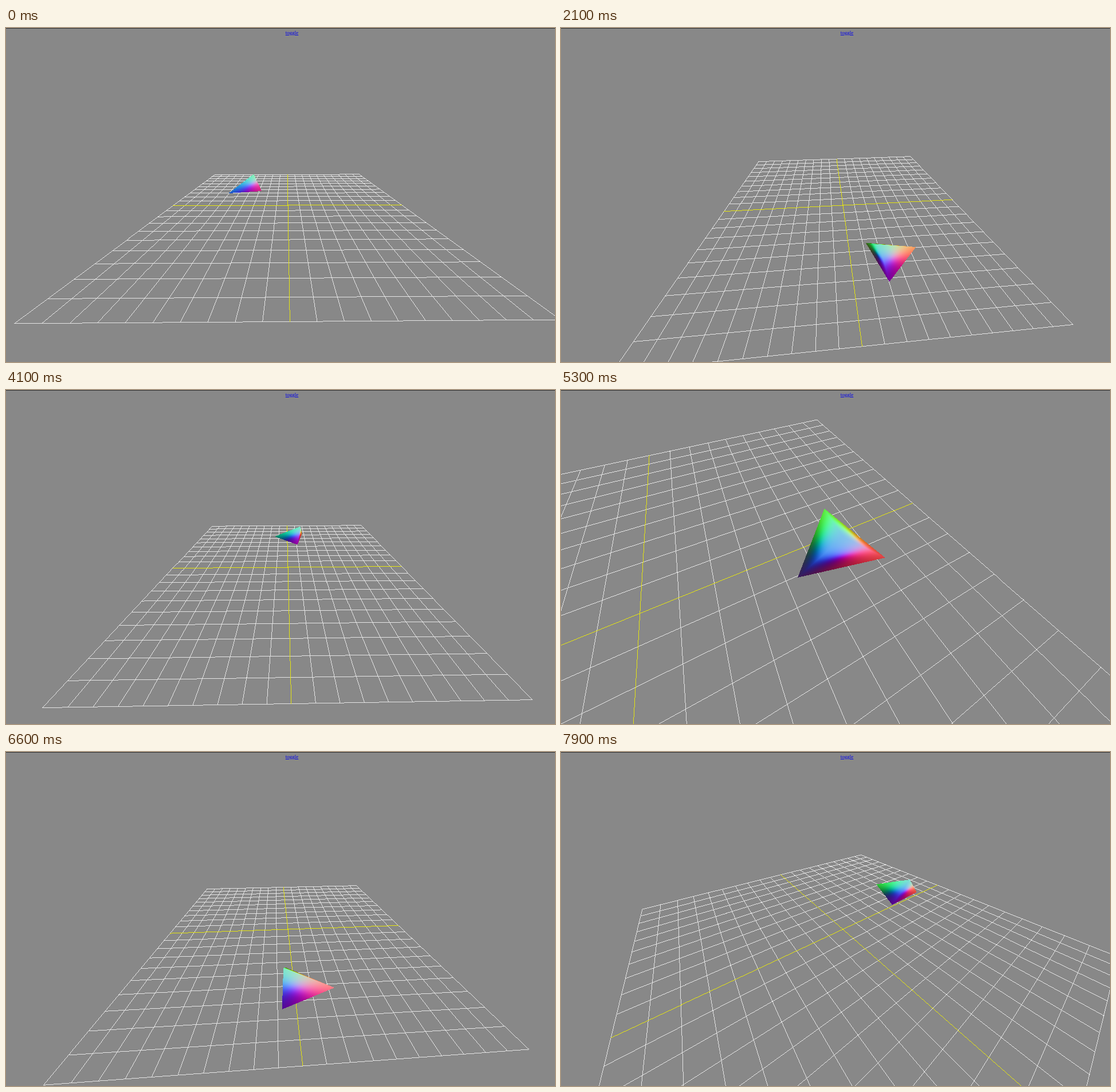
An HTML page with a canvas that plays this animation: 958 by 584 pixels, repeating every 8 s.

```html
<!DOCTYPE html>
<html lang="en">
<head>
<meta charset="utf-8">
<title>Orbiting pyramid</title>
<style>
  html, body { margin: 0; width: 100%; height: 100%; overflow: hidden; background: #888; }
  canvas, svg { position: absolute; left: 0; top: 0; display: block; }
  text { font: 9px "Liberation Serif", "Times New Roman", serif; text-decoration: underline; }
</style>
</head>
<body>
<canvas id="stage" width="958" height="584"></canvas>
<svg width="958" height="584"><text id="link" x="499" y="11" text-anchor="middle" fill="#00e">toggle</text></svg>
<script>
const W = 958, H = 584, LOOP = 8000;
const CX = 492, CY = 310, FOCAL = 310, NEAR = 0.5;
const ctx = document.getElementById('stage').getContext('2d');
const link = document.getElementById('link');
const image = ctx.createImageData(W, H);
const pixels = new Uint32Array(image.data.buffer);
const rgb = (r, g, b) => (255 << 24 | b << 16 | g << 8 | r) >>> 0;
const GRAY = rgb(136, 136, 136), WHITE = rgb(228, 228, 228), YELLOW = rgb(228, 228, 16), DARK = rgb(45, 45, 45);
const RAD = Math.PI / 180;

// time, turn, pitch, distance of the free camera
const cameraKeys = [
  [0, 0.007, 0.4412, 15.55],
  [1000, 0.007, 0.4412, 15.55],
  [1850, 0.083, 0.6608, 15.55],
  [2150, 0.083, 0.6608, 15.55],
  [2700, 0.0136, 0.592, 15.55],
  [6550, 0.0136, 0.592, 15.55],
  [6850, 0.63, 0.698, 15.55],
  [7150, 0.63, 0.698, 7.88],
  [7250, 0.63, 0.698, 7.88],
  [7800, 0.63, 0.698, 10.7],
  [LOOP, 0.63, 0.698, 10.7]
];
const RADIUS = 6, FOLLOW_TURN = 15 * RAD;
const orbitAngle = t => (127.6 + 0.07522 * t) * RAD;

function freeCamera(t) {
  let i = 1;
  while (i < cameraKeys.length - 1 && cameraKeys[i][0] <= t) i++;
  const a = cameraKeys[i - 1], b = cameraKeys[i];
  const k = (t - a[0]) / (b[0] - a[0]), s = k * k * (3 - 2 * k);
  const [turn, pitch, dist] = [1, 2, 3].map(j => a[j] + (b[j] - a[j]) * s);
  return { turn, pitch, dist, target: [0, 0] };
}

function followCamera(t) {
  return {
    turn: FOLLOW_TURN - orbitAngle(t), pitch: Math.atan2(5, 3.12), dist: Math.hypot(5, 3.12),
    target: [RADIUS * Math.cos(FOLLOW_TURN), RADIUS * Math.sin(FOLLOW_TURN)]
  };
}

// World axes: east, north, up. View axes: right, up, toward the viewer.
function makeView({ turn, pitch, dist, target }) {
  const ct = Math.cos(turn), st = Math.sin(turn), c = Math.cos(pitch), s = Math.sin(pitch);
  const direction = ([e, n, u]) => {
    const f = e * st + n * ct;
    return [e * ct - n * st, f * s + u * c, u * s - f * c];
  };
  const point = ([e, n, u]) => {
    const r = e * ct - n * st - target[0], f = e * st + n * ct - target[1];
    return [r, f * s + u * c, dist + f * c - u * s];
  };
  return { direction, point };
}

const project = ([x, y, d]) => [CX + FOCAL * x / d, CY - FOCAL * y / d, d];

function drawLine(view, from, to, color) {
  let a = view.point(from), b = view.point(to);
  if (a[2] < b[2]) [a, b] = [b, a];
  if (a[2] < NEAR) return;
  if (b[2] < NEAR) {
    const k = (a[2] - NEAR) / (a[2] - b[2]);
    b = a.map((v, i) => v + (b[i] - v) * k);
  }
  const [x0, y0] = project(a), [x1, y1] = project(b);
  const steps = Math.ceil(Math.max(Math.abs(x1 - x0), Math.abs(y1 - y0), 1));
  for (let i = 0; i <= steps; i++) {
    const x = Math.floor(x0 + (x1 - x0) * i / steps), y = Math.floor(y0 + (y1 - y0) * i / steps);
    if (x >= 0 && x < W && y >= 0 && y < H) pixels[y * W + x] = color;
  }
}

function drawGrid(view) {
  const pair = (i, color) => {
    drawLine(view, [i, -10, 0], [i, 10, 0], color);
    drawLine(view, [-10, i, 0], [10, i, 0], color);
  };
  for (let i = -10; i <= 10; i++) if (i) pair(i, WHITE);
  pair(0, YELLOW);
}

// Pyramid in its own axes: outward, ahead, up
const vertices = [[0, 3, 0], [1.5, 0, 0], [-1.5, 0, 0], [0, 0, 1.5]];
const normals = [[0, 1, 0], [2, -1, -2], [-2, -1, -2], [0, 0, 1]].map(n => {
  const len = Math.hypot(...n);
  return n.map(v => v / len);
});
const faces = [[3, 1, 2], [3, 0, 1], [3, 2, 0]];

const cross = (a, b, x, y) => (b[0] - a[0]) * (y - a[1]) - (b[1] - a[1]) * (x - a[0]);

function drawFace(p, n) {
  const area = cross(p[0], p[1], p[2][0], p[2][1]);
  if (area <= 0) return;
  const xs = p.map(v => v[0]), ys = p.map(v => v[1]);
  const left = Math.max(0, Math.floor(Math.min(...xs))), right = Math.min(W - 1, Math.ceil(Math.max(...xs)));
  const top = Math.max(0, Math.floor(Math.min(...ys))), bottom = Math.min(H - 1, Math.ceil(Math.max(...ys)));
  for (let y = top; y <= bottom; y++) {
    for (let x = left; x <= right; x++) {
      let a = cross(p[1], p[2], x + 0.5, y + 0.5);
      let b = cross(p[2], p[0], x + 0.5, y + 0.5);
      let c = cross(p[0], p[1], x + 0.5, y + 0.5);
      if (a < 0 || b < 0 || c < 0) continue;
      a /= p[0][2]; b /= p[1][2]; c /= p[2][2];
      const nx = a * n[0][0] + b * n[1][0] + c * n[2][0];
      const ny = a * n[0][1] + b * n[1][1] + c * n[2][1];
      const nz = a * n[0][2] + b * n[1][2] + c * n[2][2];
      const k = 127.5 / (Math.hypot(nx, ny, nz) || 1);
      pixels[y * W + x] = rgb(127.5 + nx * k, 127.5 + ny * k, 127.5 + nz * k);
    }
  }
}

function drawPyramid(view, angle) {
  const c = Math.cos(angle), s = Math.sin(angle);
  const place = ([x, y, u], offset) => [(x + offset) * c - y * s, (x + offset) * s + y * c, u];
  const points = vertices.map(v => project(view.point(place(v, RADIUS))));
  const shades = normals.map(n => view.direction(place(n, 0)));
  for (const face of faces) drawFace(face.map(i => points[i]), face.map(i => shades[i]));
}

function render(t) {
  const following = t >= 4600 && t < 6500;
  const pressed = (t >= 4500 && t < 4600) || (t >= 6400 && t < 6500);
  const view = makeView(following ? followCamera(t) : freeCamera(t));
  pixels.fill(GRAY);
  drawGrid(view);
  drawPyramid(view, orbitAngle(t));
  pixels.fill(DARK, 0, W);
  ctx.putImageData(image, 0, 0);
  link.setAttribute('fill', pressed ? '#e00' : '#00e');
}

const start = performance.now();
function tick() {
  render((performance.now() - start) % LOOP);
  requestAnimationFrame(tick);
}
tick();
</script>
</body>
</html>
```
